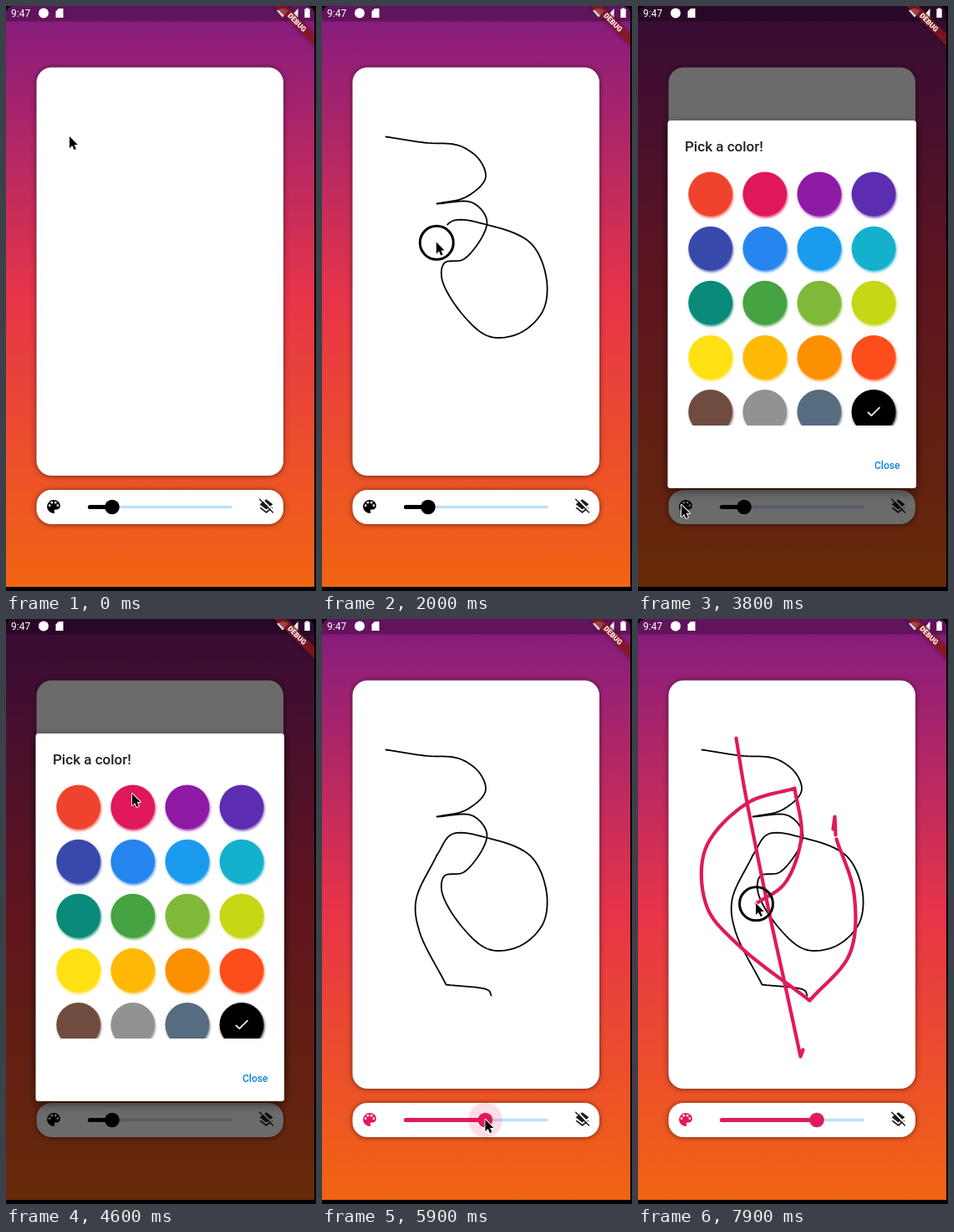
Recreate the animation shown at these times as an HTML page with a canvas. Size 371 by 700 pixels, loop 8000 ms.

```html
<!DOCTYPE html>
<html lang="en">
<head>
<meta charset="utf-8">
<title>Drawing app</title>
<style>
html, body { margin: 0; width: 100%; height: 100%; overflow: hidden; background: #000; }
canvas { display: block; width: 371px; height: 700px; }
</style>
</head>
<body>
<canvas id="stage" width="371" height="700"></canvas>
<script>
const c = document.getElementById('stage').getContext('2d');
const LOOP = 8000, LAG = 60, PINK = '#e0195d', BLACK = '#000';
const FONT = 'Roboto, "Open Sans", sans-serif';

const clamp = (v, a = 0, b = 1) => Math.min(b, Math.max(a, v));
const ramp = (t, a, b) => clamp((t - a) / (b - a));
const ease = p => p * p * (3 - 2 * p);
const mix = (p, q, k) => p.map((v, i) => v + (q[i] - v) * k);
const dist = (p, q) => Math.hypot(p[0] - q[0], p[1] - q[1]);

// Centripetal Catmull-Rom curve through a few key points.
function spline(keys, steps = 10) {
  if (keys.length < 2) return keys;
  const all = [mix(keys[0], keys[1], -1), ...keys, mix(keys.at(-1), keys.at(-2), -1)];
  const out = [keys[0]];
  for (let i = 1; i < keys.length; i++) {
    const [a, b, d, e] = all.slice(i - 1, i + 3);
    const t1 = Math.sqrt(dist(a, b)), t2 = t1 + Math.sqrt(dist(b, d)), t3 = t2 + Math.sqrt(dist(d, e));
    for (let s = 1; s <= steps; s++) {
      const t = t1 + (t2 - t1) * s / steps;
      const ab = mix(a, b, t / t1), bd = mix(b, d, (t - t1) / (t2 - t1)), de = mix(d, e, (t - t2) / (t3 - t2));
      out.push(mix(mix(ab, bd, t / t2), mix(bd, de, (t - t1) / (t3 - t1)), (t - t1) / (t2 - t1)));
    }
  }
  return out;
}

// A gesture moves the pointer along a path; with ink it also leaves a line. A slash marks a sharp corner.
function gesture(t0, t1, path, ink, width) {
  const pts = [];
  for (const part of path.split(' / ')) {
    const keys = part.split(' ').map(p => p.split(',').map(Number));
    pts.push(...spline([...pts.slice(-1), ...keys]));
  }
  let len = 0;
  const at = pts.map((p, i) => i ? len += dist(p, pts[i - 1]) : 0);
  return { t0, t1, pts, at, len, ink, width };
}

const gestures = [
  gesture(0, 150, '76,156'),
  gesture(150, 2000, '76,156 122,163 165,167 189,185 195,206 172,228 137,236 / 180,235 197,258 170,302 ' +
    '146,307 143,326 168,369 200,395 236,391 264,364 268,325 249,283 196,261 155,257 137,282', BLACK, 1.8),
  gesture(2000, 2400, '137,282 112,336 116,373 148,437 / 199,444 202,450', BLACK, 1.8),
  gesture(2450, 2720, '202,450 52,597'),
  gesture(3850, 4450, '52,597 151,209'),
  gesture(4650, 4800, '151,209 147,218'),
  gesture(4900, 5400, '147,218 127,599'),
  gesture(5550, 6050, '127,599 214,599'),
  gesture(6180, 6390, '214,599 117,142'),
  gesture(6400, 6710, '117,142 127,203 157,353 175,435 194,523 / 197,515', PINK, 4.2),
  gesture(6720, 6840, '197,515 233,251'),
  gesture(6850, 7200, '233,251 235,236 / 236,258', PINK, 4.2),
  gesture(7200, 7840, '237,263 258,328 253,400 205,456 / 120,390 82,344 80,275 130,220 187,202 / ' +
    '195,260 175,316 141,340', PINK, 4.2)
];

const swatches = ('f0432e e0175a 8e1aa4 5c2db0 3949ab 2785ef 1a9bee 14b0cc 0a8a78 45a341 ' +
  '80b939 c6d715 fde113 fdb905 fd9000 fd4d1a 6f4c3f 929292 566c7f 000000').split(' ').map(h => '#' + h);

const paletteBody = new Path2D('M12 3a9 9 0 1 0 0 18c2 0 1.6-1.8 1.1-2.5-.9-1.2 0-2.5 1.2-2.5H16a5 5 0 0 0 5-5' +
  'c0-4.4-4-8-9-8z');
const layers = new Path2D('M12 2l9 7-9 7-9-7zM4.6 12.8L12 18.5l7.4-5.7L21 14.1l-9 7-9-7z');
const sdCard = new Path2D('M63 3H68.5V14H59.5V6.5z');
const wifi = new Path2D('M324 5.5Q331 .5 338 5.5L331 13.5z');
const signal = new Path2D('M349.5 3V13.5H340z');
const battery = new Path2D('M359 2.5h3v1h1.7v10.5h-6.4v-10.5h1.7z');
const arrow = new Path2D('M0 0V15.5L3.6 12.1 6.1 17.8 8.8 16.6 6.3 11.1H11z');

function fill(color, path) {
  c.fillStyle = color;
  path ? c.fill(path) : c.fill();
}
function rect(x, y, w, h, color) {
  c.fillStyle = color;
  c.fillRect(x, y, w, h);
}
function dot(x, y, r, color) {
  c.beginPath();
  c.arc(x, y, r, 0, 7);
  fill(color);
}
function shadow(color, blur, x = 0, y = 0) {
  c.shadowColor = color;
  c.shadowBlur = blur;
  c.shadowOffsetX = x;
  c.shadowOffsetY = y;
}
function box(x, y, w, h, r, color) {
  c.beginPath();
  c.roundRect(x, y, w, h, r);
  fill(color);
}
function text(s, x, y, size, weight, color) {
  c.font = `${weight} ${size}px ${FONT}`;
  c.fillStyle = color;
  c.fillText(s, x, y);
}
function polyline(points, width, color) {
  c.beginPath();
  for (const p of points) c.lineTo(...p);
  c.lineWidth = width;
  c.strokeStyle = color;
  c.stroke();
}
// Icons are drawn on a 24-unit grid around their centre.
function icon(x, y, paint) {
  c.save();
  c.translate(x, y);
  c.scale(.88, .88);
  c.translate(-12, -12);
  paint();
  c.restore();
}

function pointAt(g, p) {
  const d = p * g.len;
  const i = g.at.findIndex(a => a >= d);
  if (i < 0) return g.pts.at(-1);
  if (!i) return g.pts[0];
  return mix(g.pts[i - 1], g.pts[i], (d - g.at[i - 1]) / (g.at[i] - g.at[i - 1]));
}

function drawInk(g, t) {
  const p = ramp(t - LAG, g.t0, g.t1);
  if (!g.ink || !p) return;
  c.save();
  c.translate(.5, .5);
  polyline([...g.pts.filter((_, i) => g.at[i] <= p * g.len), pointAt(g, p)], g.width, g.ink);
  c.restore();
}

function drawBackground() {
  const g = c.createLinearGradient(0, 0, 0, 695);
  g.addColorStop(0, '#821b80');
  g.addColorStop(.5, '#e63449');
  g.addColorStop(1, '#f16512');
  rect(0, 0, 371, 700, BLACK);
  box(0, 0, 369, 695, [9, 9, 0, 0], g);
  box(0, 0, 369, 18.5, [9, 9, 0, 0], 'rgba(0,0,0,.28)');
}

function drawCards() {
  shadow('rgba(0,0,0,.55)', 6, 0, .5);
  box(36.5, 73.5, 295.5, 488.5, 18, '#fff');
  box(36.5, 579, 295.5, 41, 18, '#fff');
  shadow('transparent', 0);
}

function drawToolbar(t) {
  const color = t < 4660 ? BLACK : PINK;
  const x = 127 + 87 * ease(ramp(t, 5550, 6050));
  icon(57, 599, () => {
    fill(color, paletteBody);
    for (const [hx, hy] of [[6.5, 10.5], [9.5, 6.5], [14.5, 6.5], [17.5, 10.5]]) dot(hx, hy, 1.5, '#fff');
  });
  icon(311.5, 599, () => {
    fill('#1c1c1c', layers);
    polyline([[4.5, .5], [22.5, 18.5]], 2, '#fff');
    polyline([[3, 2], [21, 20]], 1.6, '#1c1c1c');
  });
  polyline([[x, 599.5], [269, 599.5]], 3.4, '#bfe0f8');
  polyline([[100.5, 599.5], [x, 599.5]], 5.2, color);
  c.globalAlpha = .14 * Math.min(ramp(t, 5500, 5600), 1 - ramp(t, 6080, 6200));
  dot(x, 599.5, 20.5, color);
  c.globalAlpha = 1;
  dot(x, 599.5, 8.8, color);
}

function drawDialog(t) {
  const alpha = Math.min(ramp(t, 3650, 3800), 1 - ramp(t, 4650, 4790));
  if (!alpha) return;
  c.save();
  c.globalAlpha = alpha;
  rect(0, 0, 369, 695, 'rgba(0,0,0,.58)');
  shadow('rgba(0,0,0,.5)', 12, 0, 4);
  box(35.5, 137, 297.5, 440, 3.5, '#fff');
  shadow('transparent', 0);
  text('Pick a color!', 56, 174, 17, 500, '#212121');
  text('Close', 283, 554, 12, 500, '#0b84dc');
  c.beginPath();
  c.rect(50, 190, 270, 312);
  c.clip();
  const chosen = t < 4650 ? 19 : 1;
  swatches.forEach((color, i) => {
    const x = 86.7 + i % 4 * 65.1, y = 225 + (i >> 2) * 65.1;
    shadow(color + 'cc', 3, 1, 2);
    dot(x, y, 26.4, color);
    shadow('transparent', 0);
    if (i === chosen) icon(x, y, () => polyline([[4.5, 13], [9, 17.4], [19.9, 6.6]], 1.9, '#fff'));
  });
  c.restore();
}

function drawBanner() {
  c.save();
  c.beginPath();
  c.rect(0, 0, 369, 695);
  c.clip();
  c.translate(369, 0);
  c.rotate(Math.PI / 4);
  shadow('rgba(0,0,0,.5)', 5);
  rect(-40, 23.4, 80, 10.4, 'rgba(150,24,28,.72)');
  shadow('transparent', 0);
  c.textAlign = 'center';
  text('DEBUG', -.7, 31.5, 8.6, 900, '#fff');
  c.restore();
}

function drawStatus() {
  text('9:47', 6, 13.2, 12, 400, '#fff');
  dot(45, 8.5, 6, '#fff');
  for (const path of [sdCard, wifi, signal, battery]) fill('#fff', path);
}

function drawPointer(t) {
  const g = gestures.findLast(s => s.t0 <= t);
  const p = ramp(t, g.t0, g.t1);
  const [x, y] = pointAt(g, g.ink ? p : ease(p));
  if (g.ink && t < g.t1 + 160) {
    c.beginPath();
    c.arc(x + .5, y + .8, 20, 0, 7);
    c.lineWidth = 3;
    c.strokeStyle = BLACK;
    c.stroke();
  }
  c.save();
  c.translate(x, y);
  c.scale(.9, .9);
  c.lineWidth = 2;
  c.strokeStyle = '#fff';
  c.stroke(arrow);
  fill(BLACK, arrow);
  c.restore();
}

function draw(t) {
  c.lineCap = c.lineJoin = 'round';
  drawBackground();
  drawCards();
  gestures.forEach(g => drawInk(g, t));
  drawToolbar(t);
  drawDialog(t);
  drawStatus();
  drawBanner();
  drawPointer(t);
}

const start = performance.now();
function tick() {
  draw((performance.now() - start) % LOOP);
  requestAnimationFrame(tick);
}
tick();
</script>
</body>
</html>
```
